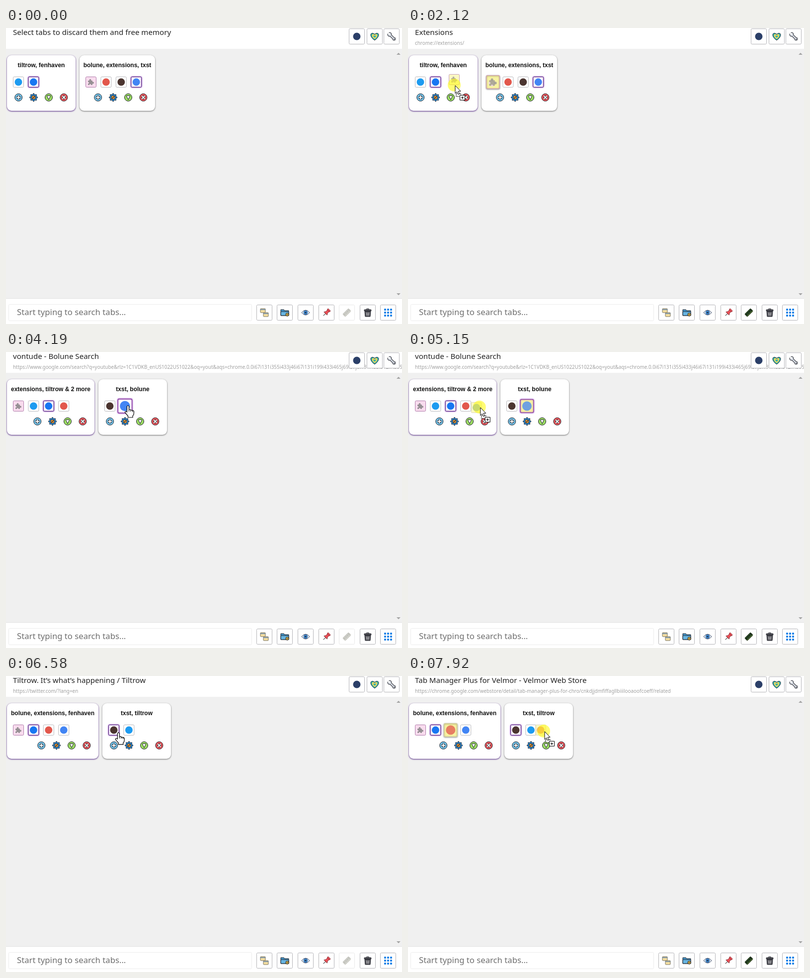
Write an HTML page with a canvas that moves like this. It is 797 by 597 pixels and loops after 8000 ms.

```html
<!DOCTYPE html>
<html lang="en">
<head>
<meta charset="utf-8">
<title>Tab manager</title>
<style>
  html, body { margin: 0; width: 100%; height: 100%; overflow: hidden; background: #fff; }
  canvas { display: block; }
</style>
</head>
<body>
<canvas id="stage" width="797" height="597"></canvas>
<script>
const ctx = document.getElementById('stage').getContext('2d');
const LOOP = 8000, STEP = 30.4, TAB_Y = 109, ACTION_Y = 140;
const INK = '#20222a';
const CARD_FONT = 'bold 12px "Liberation Sans", Arial, sans-serif';

const CAPTIONS = {
  intro: ['Select tabs to discard them and free memory', ''],
  ext: ['Extensions', 'chrome://extensions/'],
  store: ['Tab Manager Plus for Velmor - Velmor Web Store',
    'https://chrome.google.com/webstore/detail/tab-manager-plus-for-chro/cnkdjjdmfiffagllbiiilooaoofcoeff/related'],
  search: ['vontude - Bolune Search',
    'https://www.google.com/search?q=youtube&rlz=1C1VDKB_enUS1022US1022&oq=yout&aqs=chrome.0.0i67i131i355i433j46i67i131i199i433i465j69i57j0i131i433i512l7.395j0j4'],
  bird: ['Tiltrow. It’s what’s happening / Tiltrow', 'https://twitter.com/?lang=en'],
};

const captionTimes = [
  [0, 'intro'], [850, 'store'], [1250, 'ext'], [2420, 'bird'], [2700, 'store'],
  [3930, 'search'], [5290, 'store'], [5430, 'bird'], [6750, 'search'], [6960, 'store'],
];

const layouts = [
  [0, ['tiltrow, fenhaven', 'bird social'], ['bolune, extensions, txst', 'ext store star search'], 'search'],
  [2400, ['extensions, tiltrow, fenhaven', 'ext bird social'], ['bolune, txst', 'store star search'], 'search'],
  [3640, ['extensions, tiltrow & 2 more', 'ext bird social store'], ['txst, bolune', 'star search'], 'search'],
  [5200, ['bolune, extensions & 2 more', 'ext bird social store search'], ['txst', 'star'], 'star'],
  [6450, ['bolune, extensions, fenhaven', 'ext social store search'], ['txst, tiltrow', 'star bird'], 'star'],
];

// start, end, tab, ghost offset from the pointer
const drags = [
  [1740, 2400, 'ext', -13, -23], [3040, 3640, 'store', -10, -14],
  [4300, 5200, 'search', -19, -11], [5740, 6450, 'bird', -24, -15],
  [7420, 8000, 'store', -19, -14],
];

const pointerPath = [
  [170, 690, 570], [900, 205, 118], [1040, 203, 118], [1350, 173, 121], [1740, 173, 121],
  [2120, 95, 116], [2400, 60, 113], [2480, 60, 113], [2850, 212, 112], [3040, 212, 112],
  [3490, 122, 112], [3640, 115, 112], [3990, 247, 109], [4300, 247, 109], [4900, 155, 112],
  [5200, 145, 112], [5500, 68, 113], [5740, 68, 113], [5880, 111, 115], [5950, 197, 118],
  [6200, 244, 116], [6450, 244, 116], [7100, 91, 107], [7420, 91, 107], [7920, 275, 112],
];

const markColors = { bird: '#1d9bf0', social: '#1877f2', store: '#e2574c', star: '#4b3530', search: '#4285f4' };

const latest = (list, t) => list.filter(item => item[0] <= t).pop();

function pointerAt(t) {
  const next = pointerPath.findIndex(p => p[0] > t);
  if (next === 0) return null;
  if (next < 0) return pointerPath[pointerPath.length - 1].slice(1);
  const [a, b] = [pointerPath[next - 1], pointerPath[next]];
  const u = (t - a[0]) / (b[0] - a[0]), k = u * u * (3 - 2 * u);
  return [a[1] + (b[1] - a[1]) * k, a[2] + (b[2] - a[2]) * k];
}

function paint(fill, stroke, width = 1) {
  if (fill) { ctx.fillStyle = fill; ctx.fill(); }
  if (stroke) { ctx.strokeStyle = stroke; ctx.lineWidth = width; ctx.stroke(); }
}
function circle(x, y, r, fill, stroke, width) {
  ctx.beginPath(); ctx.arc(x, y, r, 0, 7); paint(fill, stroke, width);
}
function box(x, y, w, h, r, fill, stroke, width) {
  ctx.beginPath(); ctx.roundRect(x, y, w, h, r); paint(fill, stroke, width);
}
function poly(points, fill, stroke, width) {
  ctx.beginPath();
  for (let i = 0; i < points.length; i += 2) ctx.lineTo(points[i], points[i + 1]);
  ctx.closePath(); paint(fill, stroke, width);
}
function lines(segments, color, width) {
  ctx.beginPath();
  for (const [x, y, x2, y2] of segments) { ctx.moveTo(x, y); ctx.lineTo(x2, y2); }
  paint(null, color, width);
}
function text(string, x, y, font, color, align = 'left') {
  ctx.font = font; ctx.fillStyle = color; ctx.textAlign = align;
  ctx.fillText(string, x, y);
}
function at(x, y, draw, scale = 1, angle = 0) {
  ctx.save();
  ctx.translate(x, y); ctx.rotate(angle); ctx.scale(scale, scale);
  draw();
  ctx.restore();
}
function shadow(color, blur, dy) {
  ctx.shadowColor = color; ctx.shadowBlur = blur; ctx.shadowOffsetY = dy;
}
function gear(r, fill) {
  ctx.beginPath();
  for (let i = 0; i < 32; i++) {
    const a = (i - .5) * Math.PI / 16, d = i % 4 < 2 ? r : r * .76;
    ctx.lineTo(Math.cos(a) * d, Math.sin(a) * d);
  }
  ctx.closePath(); paint(fill, INK);
}

function puzzle() {
  const gray = '#969094';
  box(-6, -3, 9, 9, 1, gray);
  circle(-1.5, -4, 2, gray);
  circle(4, 1.5, 2, gray);
  circle(-5.5, 1.5, 1.6, '#f6dcee');
  circle(-1.5, 5.5, 1.6, '#f6dcee');
}
function favicon(name) {
  if (name === 'ext') puzzle();
  else circle(0, 0, 7.5, markColors[name]);
}

function tabColors(name, { active, hovered, dragged }) {
  const pinned = name === 'ext';
  const fill = dragged ? '#f8f3a2' : pinned ? '#f8dcee' : '#fff';
  if (active) return [fill, hovered || dragged ? '#8a3f9c' : '#43176b'];
  if (pinned) return [fill, dragged ? '#d0a0b4' : '#b07bab'];
  return [fill, dragged ? '#d2cfa6' : '#b9b9bd'];
}

function drawTab(name, x, state) {
  const { active, hovered, dragged } = state;
  at(x, TAB_Y, () => {
    ctx.save();
    if (active) shadow('#a04fd0', 3, 0);
    else if (hovered || dragged) shadow('#0006', 3, 1);
    box(-10.5, -10.5, 21, 21, 2, ...tabColors(name, state));
    ctx.restore();
    if (dragged) ctx.globalAlpha = .75;
    favicon(name);
  }, dragged ? 1.27 : hovered ? 1.36 : 1);
}

const actions = [
  () => {
    circle(0, 0, 7.5, '#72c4ec', INK);
    lines([[-4.5, 0, 4.5, 0], [0, -4.5, 0, 4.5]], INK, 4);
    lines([[-4, 0, 4, 0], [0, -4, 0, 4]], '#fff', 2);
  },
  () => {
    gear(8, '#2588d5');
    circle(0, 0, 3.8, '#f2a13b', INK);
    lines([[-2, 2, 2, -2]], INK, 1.3);
  },
  () => {
    circle(0, 0, 7.5, '#9bdc63', INK);
    poly([-3.8, -3.5, 3.8, -3.5, 0, 4.5], '#fff', INK);
  },
  () => {
    circle(0, 0, 7.5, '#ea5459', INK);
    lines([[-3, -3, 3, 3], [-3, 3, 3, -3]], INK, 4);
    lines([[-3, -3, 3, 3], [-3, 3, 3, -3]], '#fff', 2);
  },
];

function cardWidth(title) {
  ctx.font = CARD_FONT;
  return Math.max(138, Math.round(ctx.measureText(title).width + 15.5));
}

function drawCard(x, [title, names], main, activeTab, hoverTab, dragTab) {
  const w = cardWidth(title);
  ctx.save();
  shadow(main ? '#4b1f7c' : '#0008', 3, 1);
  box(x, 55, w, 112, 9, '#fff');
  ctx.restore();
  text(title, x + w / 2, 79, CARD_FONT, '#111', 'center');
  actions.forEach((draw, i) => at(x + w - 23.6 - (3 - i) * STEP, ACTION_Y, draw));
  names.split(' ').forEach((name, i) => drawTab(name, x + 23 + i * STEP, {
    active: name === activeTab, hovered: name === hoverTab, dragged: name === dragTab,
  }));
}

function isOver(name, cards, pointer) {
  if (!pointer || Math.abs(pointer[1] - TAB_Y) > 15) return false;
  return cards.some(([x, names]) => {
    const i = names.split(' ').indexOf(name);
    return i >= 0 && Math.abs(pointer[0] - x - 23 - i * STEP) < 15;
  });
}

function heart(s, fill, stroke) {
  ctx.beginPath();
  ctx.moveTo(0, 7 * s);
  ctx.bezierCurveTo(-12 * s, -1 * s, -7 * s, -10 * s, 0, -4 * s);
  ctx.bezierCurveTo(7 * s, -10 * s, 12 * s, -1 * s, 0, 7 * s);
  paint(fill, stroke);
}
const headerIcons = [
  [690, () => circle(0, 0, 7.5, '#2b3f68')],
  [726, () => { heart(1.1, '#2bb3b0', INK); heart(.75, '#f7d358'); heart(.35, '#2bb3b0'); }],
  [760, () => {
    lines([[-4, -4, 5, 5]], INK, 5);
    circle(-4, -4, 4, '#d5dae2', INK);
    circle(5, 5, 3, '#d5dae2', INK);
    lines([[-4, -4, 5, 5]], '#d5dae2', 3);
    poly([-9, -7, -7, -9, -3, -5, -5, -3], '#fff');
    circle(5.5, 5.5, 1, INK);
  }],
];

function miniWindow(x, y) {
  box(x, y, 10, 8, 1, '#f5dfa0', '#77715f');
  lines([[x, y + 2, x + 10, y + 2]], '#5c80ad', 1.5);
}
function pin() {
  lines([[0, 2, 0, 10]], '#555', 1.3);
  poly([-3, -7, 3, -7, 2.5, -1, 5, 3, -5, 3, -2.5, -1], '#ed4e55', '#7c3037');
  box(-4, -9, 8, 3, 1, '#ed4e55', '#7c3037');
}
function memoryStick(enabled) {
  box(-8, -3.5, 16, 7, 1, enabled ? '#2f5426' : '#d0d0ca', enabled ? '#1d2e19' : '#c4c4be');
  for (let i = -6; i < 7; i += 4) box(i - 1, -2, 2.5, 3, 0, enabled ? '#15211a' : '#bfc0ba');
  for (let i = -7; i < 8; i += 2) lines([[i, 2, i, 4]], enabled ? '#7f8a48' : '#ddddd5', .8);
}
const footerIcons = [
  [504, () => { miniWindow(-8, -8); miniWindow(-2, 0); }],
  [545, () => {
    poly([-8, -6, -2, -6, 0, -4, 8, -4, 8, 6, -8, 6], '#4295ca', INK);
    box(-8, -2, 16, 8, 1, '#67b5e2', INK);
    at(5, 4, () => { gear(3.5, '#f2c145'); circle(0, 0, 1, INK); });
  }],
  [587, () => {
    ctx.beginPath();
    ctx.moveTo(-8, 0); ctx.quadraticCurveTo(0, -10, 8, 0); ctx.quadraticCurveTo(0, 10, -8, 0);
    paint('#eef7ff', '#33425f');
    circle(0, 0, 3.8, '#3d8cd8', '#28588f'); circle(0, 0, 1.5, INK);
  }],
  [629, () => at(0, 0, pin, .9, Math.PI / 4)],
  [670, enabled => at(0, 0, () => memoryStick(enabled), 1, -Math.PI / 4)],
  [712, () => {
    box(-7, -6, 14, 3, 1, '#54545a', INK);
    box(-2.5, -8, 5, 2, 1, null, INK);
    poly([-6, -2.5, 6, -2.5, 5, 8, -5, 8], '#54545a', INK);
    lines([[-2.5, 0, -2, 6], [0, 0, 0, 6], [2.5, 0, 2, 6]], '#c4c4c8', 1);
  }],
  [753, () => {
    for (let i = 0; i < 9; i++) box(-8 + i % 3 * 6, -8 + Math.floor(i / 3) * 6, 4, 4, 1, '#2385e8');
  }],
];
function button(x, y, draw, enabled = true) {
  box(x + .5, y + .5, 31, 31, 2, '#fff', enabled ? '#b4b4b8' : '#e8e8e8');
  at(x + 16, y + 16, () => draw(enabled));
}

function hand() {
  ctx.translate(-1.5, -1);
  ctx.beginPath();
  ctx.moveTo(-2, 1.5);
  ctx.quadraticCurveTo(0, -1.5, 2, 1.5);
  ctx.lineTo(2, 8); ctx.lineTo(5, 8); ctx.lineTo(6, 9.5); ctx.lineTo(9, 9.5);
  ctx.quadraticCurveTo(12, 10, 12, 13); ctx.lineTo(11.5, 18);
  ctx.lineTo(9.5, 21); ctx.lineTo(9.5, 24); ctx.lineTo(0, 24); ctx.lineTo(0, 21);
  ctx.lineTo(-6, 14); ctx.quadraticCurveTo(-6, 10, -2, 13);
  ctx.closePath(); paint('#fff', '#000', 1.2);
  lines([[2, 8, 2, 12], [5.5, 9, 5.5, 12.5], [9, 10, 9, 13]], '#000', 1);
}
function arrow() {
  poly([0, 0, 0, 16, 3.6, 12.6, 6.2, 18, 8.6, 17, 6.2, 11.5, 11, 11.5], '#fff', '#000');
}
function dragPointer() {
  ctx.setLineDash([1.5, 1.5]);
  box(2, 16, 9, 6, 0, '#fff', '#000', 1.5);
  ctx.setLineDash([]);
  arrow();
  box(9.5, 19.5, 10, 10, 0, '#fff', '#000');
  lines([[12, 24.5, 17, 24.5], [14.5, 22, 14.5, 27]], '#000', 1.2);
}

function drawPointer(t, pointer, drag) {
  if (!pointer) return;
  const pressed = drags.some(d => t >= d[0] - 90 && t < d[1]);
  at(pointer[0], pointer[1], () => {
    if (drag) {
      ctx.globalAlpha = .7;
      at(drag[3] + 11, drag[4] + 11, () => {
        box(-10.5, -10.5, 21, 21, 2, '#faf6a8', drag[2] === 'ext' ? '#b07bab' : '#cfcbb0');
        favicon(drag[2]);
      });
      ctx.globalAlpha = 1;
    }
    if (pressed) circle(-2, -1, 13, 'rgba(255, 250, 25, .6)');
    if (drag) dragPointer();
    else if (t < 850) arrow();
    else hand();
  });
}

function draw(t) {
  const pointer = pointerAt(t);
  const drag = drags.find(d => t >= d[0] && t < d[1]);
  const captionKey = latest(captionTimes, t)[1];
  const [caption, address] = CAPTIONS[captionKey];
  const [, first, second, activeTab] = latest(layouts, t);

  box(0, 0, 797, 597, 0, '#fff');
  box(0, 42, 797, 503, 0, '#f0f0f0');
  lines([[0, 545.5, 797, 545.5]], '#e2e2e2', 1);
  poly([786, 54, 794, 54, 790, 50], '#a3a3a3');
  poly([786, 535, 794, 535, 790, 539], '#a3a3a3');

  text(caption, 14, 14, '15.1px "Noto Sans", sans-serif', '#222');
  text(address, 14, 34, '9.9px "Noto Sans", sans-serif', '#a0a0a0');
  headerIcons.forEach(([x, icon]) => button(x, 1, icon));

  const secondX = 10 + cardWidth(first[0]);
  const over = !drag && isOver(captionKey, [[2, first[1]], [secondX, second[1]]], pointer);
  const hoverTab = over ? captionKey : null, dragTab = drag && drag[2];
  drawCard(2, first, true, 'social', hoverTab, dragTab);
  drawCard(secondX, second, false, activeTab, hoverTab, dragTab);

  box(5.5, 557.5, 489, 33, 2, '#fff', '#ececec');
  text('Start typing to search tabs...', 22, 579, '16.7px "Noto Sans", sans-serif', '#6f6f6f');
  footerIcons.forEach(([x, icon]) => button(x, 558, icon, x !== 670 || Boolean(drag)));

  drawPointer(t, pointer, drag);
}

const start = performance.now();
function frame() {
  draw((performance.now() - start) % LOOP);
  requestAnimationFrame(frame);
}
frame();
</script>
</body>
</html>
```
